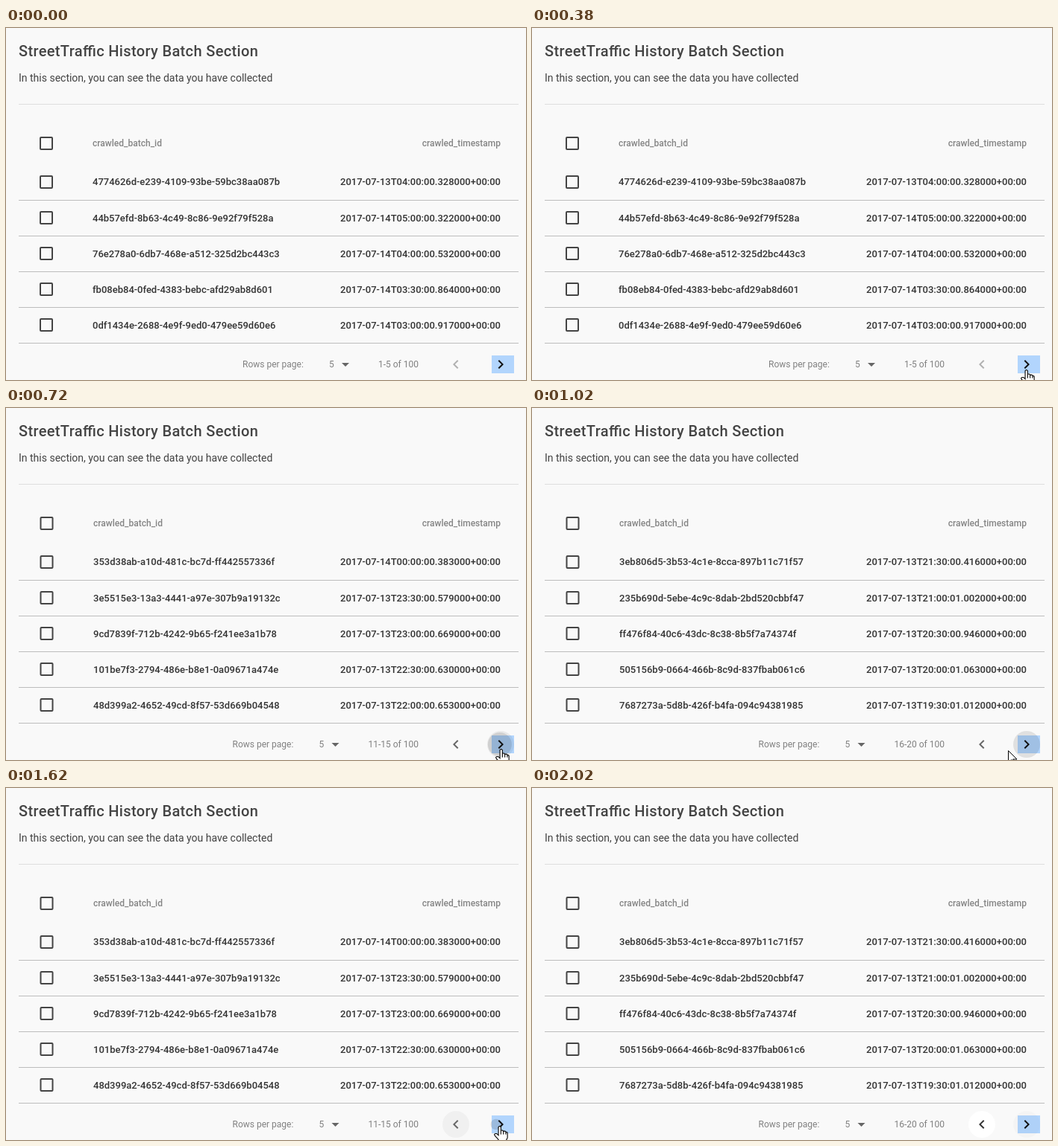
Animation, 697 px wide and 473 px high, one loop 2.16 s. Source, as an HTML page:

```html
<!DOCTYPE html>
<html lang="en">
<head>
<meta charset="utf-8">
<title>History batch table</title>
<style>
  html, body { margin: 0; width: 100%; height: 100%; overflow: hidden; background: #f9f9f9; }
  svg { display: block; width: 697px; height: 473px; font-family: Roboto, sans-serif; }
  .title { font-size: 20px; font-weight: 500; letter-spacing: .35px; font-feature-settings: "liga"; fill: #444; }
  .intro { font-size: 14px; fill: #424242; }
  .head { font-size: 12px; font-weight: 500; fill: #858585; }
  .cell { font-size: 13px; font-weight: 500; fill: #333; }
  .foot { font-size: 12px; fill: #808080; }
  .end { text-anchor: end; }
</style>
</head>
<body>
<svg id="stage" viewBox="0 0 697 473"></svg>
<script>
const LOOP = 2160, STEP = 20, ROWS = 5, ROW_HEIGHT = 48;
const LOAD = 40, GROW = 160, FADE = 500;   // page load, ripple growth and fade, ms
const ENTER = 80, SETTLED = 1680, LEAVE = 1880;
const next = { x: 663, y: 452, from: -8 };
const prev = { x: 603, y: 452, from: 8 };

const clicks = [
  { at: 460, button: next, page: 1 },
  { at: 620, button: next, page: 2 },
  { at: 800, button: next, page: 3 },
  { at: 1260, button: prev, page: 2 },
  { at: 1600, button: next, page: 3 }
];

// Cursor stops: time, x, y
const stops = [[ENTER, 681, 240], [380, 661, 459], [860, 662, 458], [1020, 638, 460], [1100, 638, 460],
  [1220, 611, 456], [1420, 611, 456], [1600, 660, 454], [1700, 661, 454], [LEAVE, 697, 342]];

const parse = text => text.trim().split('\n').map(row => row.trim().split(' '));
const pages = [
  parse(`4774626d-e239-4109-93be-59bc38aa087b 13T04:00:00.328
    44b57efd-8b63-4c49-8c86-9e92f79f528a 14T05:00:00.322
    76e278a0-6db7-468e-a512-325d2bc443c3 14T04:00:00.532
    fb08eb84-0fed-4383-bebc-afd29ab8d601 14T03:30:00.864
    0df1434e-2688-4e9f-9ed0-479ee59d60e6 14T03:00:00.917`),
  randomPage(7),
  parse(`353d38ab-a10d-481c-bc7d-ff442557336f 14T00:00:00.383
    3e5515e3-13a3-4441-a97e-307b9a19132c 13T23:30:00.579
    9cd7839f-712b-4242-9b65-f241ee3a1b78 13T23:00:00.669
    101be7f3-2794-486e-b8e1-0a09671a474e 13T22:30:00.630
    48d399a2-4652-49cd-8f57-53d669b04548 13T22:00:00.653`),
  parse(`3eb806d5-3b53-4c1e-8cca-897b11c71f57 13T21:30:00.416
    235b690d-5ebe-4c9c-8dab-2bd520cbbf47 13T21:00:01.002
    ff476f84-40c6-43dc-8c38-8b5f7a74374f 13T20:30:00.946
    505156b9-0664-466b-8c9d-837fbab061c6 13T20:00:01.063
    7687273a-5d8b-426f-b4fa-094c94381985 13T19:30:01.012`)
];

// Half-hourly batches from 02:30 down to 00:30, with seeded ids.
function randomPage(seed) {
  const random = () => (seed = seed * 16807 % 2147483647) / 2147483647;
  const hex = () => Math.floor(random() * 16).toString(16);
  return Array.from({ length: ROWS }, (_, i) => {
    const id = 'xxxxxxxx-xxxx-4xxx-9xxx-xxxxxxxxxxxx'.replace(/x/g, hex);
    const half = ROWS - i;
    const millis = 300 + Math.floor(random() * 600);
    return [id, `14T0${half >> 1}:${half % 2 ? '30' : '00'}:00.${millis}`];
  });
}

const svg = document.getElementById('stage');

function set(el, attrs) {
  for (const k in attrs) el.setAttribute(k, attrs[k]);
}
function add(tag, attrs, text) {
  const el = document.createElementNS('http://www.w3.org/2000/svg', tag);
  set(el, attrs);
  if (text) el.textContent = text;
  svg.appendChild(el);
  return el;
}
const label = (cls, x, y, text) => add('text', { class: cls, x, y }, text);
const line = (y, stroke) => add('path', { d: `M17 ${y}H687`, stroke });
const checkbox = y => add('rect', { y: y - 8, width: 16, height: 16, rx: 1, fill: 'none', stroke: '#444', 'stroke-width': 2 });
const show = (el, on) => set(el, { visibility: on ? 'visible' : 'hidden' });
const chevron = (button, dir) => add('path', {
  d: 'M3.4 4.6L-1.2 0L3.4 -4.6L2 -6L-4 0L2 6Z', fill: '#111',
  transform: `translate(${button.x} ${button.y}) scale(${dir} 1)`
});

label('title', 17, 38, 'StreetTraffic History Batch Section');
label('intro', 17, 72, 'In this section, you can see the data you have collected');
line(102.5, '#dedede');

const boxes = [checkbox(155)];
const idHead = label('head', 116, 159, 'crawled_batch_id');
label('head end', 663, 159, 'crawled_timestamp');
const rows = pages[0].map((_, i) => {
  const top = ROW_HEIGHT * i, y = top + (i ? 212 : 211);
  boxes.push(checkbox(207 + top));
  line(231.5 + top, '#bdbdbd');
  return { id: label('cell', 116, y), stamp: label('cell end', 663, y) };
});

const perPage = label('foot', 317, 456, 'Rows per page:');
const count = label('foot', 433, 456, '5');
const caret = add('path', { d: 'M450 450h10l-5 5z', fill: '#666' });
const range = label('foot end', 553, 456);

const flash = add('circle', { cx: prev.x, cy: prev.y, r: 18, fill: '#fff' });
add('rect', { x: 651, y: 440, width: 30, height: 24, fill: '#b2d5fd' });
const ripples = clicks.map(c => add('circle', { cy: c.button.y }));
const prevIcon = chevron(prev, 1);
chevron(next, -1);

const pen = { fill: '#fff', stroke: '#000' };
const arrow = add('path', { ...pen, d: 'M.5 .5V16.5L4.5 12.5L7 18.5L9 17.5L6.5 12H12Z' });
const hand = add('path', { ...pen, d: 'M5.5 11.5V1.5L6.5 .5H7.5L8.5 1.5V5.5H10.5L11.5 6.5H13.5L14.5 7.5H15.5' +
  'L16.5 8.5V14.5L15.5 16.5L14.5 18.5V21.5H6.5V18.5L4.5 15.5L1.5 12.5L.5 10.5L1.5 9.5H3.5Z' +
  'M8.5 5.5V10.5M11.5 6.5V10.5M14.5 7.5V10.5' });

function drawTable(page) {
  const nudge = page ? 1 : 0;
  boxes.forEach(b => set(b, { x: 46 + nudge / 2 }));
  set(idHead, { x: 116 + nudge });
  rows.forEach((row, i) => {
    const [id, stamp] = pages[page][i];
    row.id.textContent = id;
    set(row.id, { x: 116 + nudge });
    row.stamp.textContent = `2017-07-${stamp}000+00:00`;
  });
  range.textContent = `${page * ROWS + 1}-${page * ROWS + ROWS} of 100`;
  const shift = `translate(${-6.75 * Math.min(page, 2)} 0)`;
  [perPage, count, caret].forEach(el => set(el, { transform: shift }));
}

function drawButtons(t, page) {
  const settled = t >= SETTLED;
  show(flash, settled);
  set(prevIcon, { fill: page === 0 ? '#b0b0b0' : settled ? '#333' : '#666' });
  clicks.forEach(({ at, button }, i) => {
    const age = t - at;
    const grown = 1 - (1 - Math.min(1, Math.max(0, age / GROW))) ** 2;
    const fading = age >= 0 && age < FADE && !(settled && button === prev);
    set(ripples[i], {
      cx: button.x + button.from * (1 - grown),
      r: 4 + 14 * grown,
      opacity: fading ? .13 * (1 - age / FADE) : 0
    });
  });
}

function cursorAt(t) {
  const i = Math.max(1, stops.findIndex(s => t < s[0]));
  const [t0, x0, y0] = stops[i - 1], [t1, x1, y1] = stops[i];
  const p = (t - t0) / (t1 - t0), e = p * p * (3 - 2 * p);
  return [Math.round(x0 + (x1 - x0) * e), Math.round(y0 + (y1 - y0) * e)];
}

function drawCursor(t) {
  const visible = t >= ENTER && t < LEAVE;
  const [x, y] = visible ? cursorAt(t) : [0, 0];
  const over = [next, prev].some(b => Math.hypot(x - b.x, y - b.y) < 20);
  show(hand, visible && over);
  show(arrow, visible && !over);
  set(hand, { transform: `translate(${x - 6} ${y}) scale(1.1)` });
  set(arrow, { transform: `translate(${x} ${y})` });
}

function render(time) {
  const t = Math.floor(time % LOOP / STEP) * STEP;
  const page = clicks.reduce((now, c) => t >= c.at + LOAD ? c.page : now, 0);
  drawTable(page);
  drawButtons(t, page);
  drawCursor(t);
}

const start = performance.now();
function tick() {
  render(performance.now() - start);
  requestAnimationFrame(tick);
}
tick();
</script>
</body>
</html>
```
